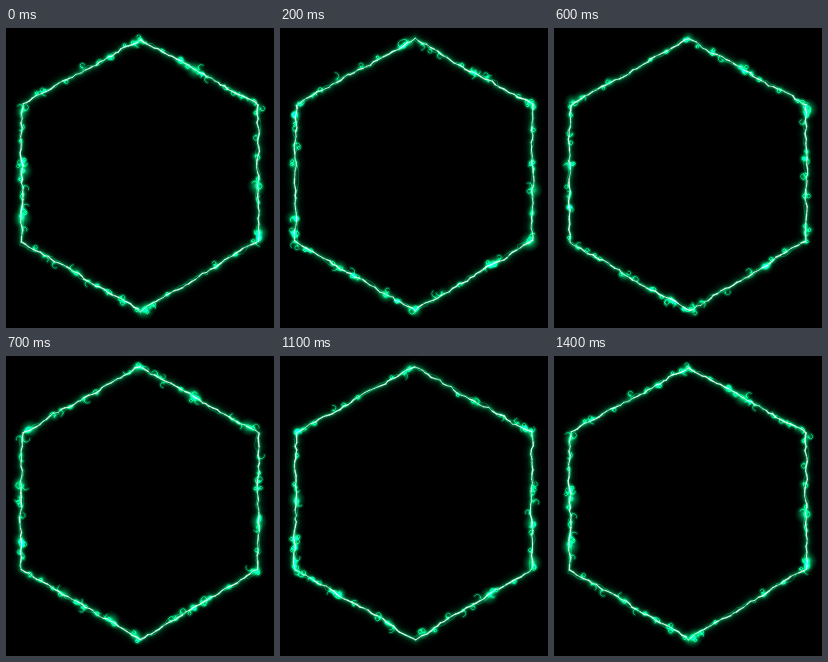
These frames come from a looping animation (268 by 300 pixels, 1.5 s). An HTML page with a canvas:

```html
<!DOCTYPE html>
<html lang="en">
<head>
<meta charset="utf-8">
<title>Electric hexagon</title>
<style>
html, body { margin: 0; width: 100%; height: 100%; overflow: hidden; background: #000; }
canvas { display: block; }
</style>
</head>
<body>
<canvas id="stage" width="268" height="300"></canvas>
<script>
const ctx = document.getElementById('stage').getContext('2d');
const STEP = 100, STEPS = 15, POSES = 14;
const CORNERS = [[134, 11], [252, 77], [252, 213], [135, 283], [15, 214], [16, 77]];
const PER_EDGE = 32;

// Places that keep flaring up: edge number plus the fraction along that edge.
const ANCHORS = [0, .46, .97, 1.6, 2, 2.39, 2.97, 3.22, 3.6, 4.22, 4.57, 5];

function seeded(seed) {
  let s = seed * 7919;
  return () => {
    s = (s + 0x6D2B79F5) | 0;
    let n = Math.imul(s ^ (s >>> 15), 1 | s);
    n = (n + Math.imul(n ^ (n >>> 7), 61 | n)) ^ n;
    return ((n ^ (n >>> 14)) >>> 0) / 4294967296;
  };
}

function pointAt(pos) {
  pos = (pos + 6) % 6;
  const edge = Math.floor(pos), f = pos - edge;
  const [ax, ay] = CORNERS[edge], [bx, by] = CORNERS[(edge + 1) % 6];
  return [ax + (bx - ax) * f, ay + (by - ay) * f];
}

function stroke(points, color, width, closed) {
  ctx.beginPath();
  points.forEach(([x, y]) => ctx.lineTo(x, y));
  if (closed) ctx.closePath();
  ctx.strokeStyle = color;
  ctx.lineWidth = width;
  ctx.stroke();
}

// A closed jagged line: each offset drifts back to the edge while being kicked.
function bolt(jitter, kick) {
  let dx = 0, dy = 0;
  return Array.from({ length: 6 * PER_EDGE }, (_, i) => {
    dx = dx * .5 + jitter(kick);
    dy = dy * .5 + jitter(kick);
    const [x, y] = pointAt(i / PER_EDGE);
    return [x + dx, y + dy];
  });
}

function glow(x, y, radius, alpha) {
  const g = ctx.createRadialGradient(x, y, 0, x, y, radius);
  g.addColorStop(0, `rgba(20,225,140,${alpha})`);
  g.addColorStop(.4, `rgba(0,185,105,${alpha * .55})`);
  g.addColorStop(1, 'rgba(0,120,65,0)');
  ctx.fillStyle = g;
  ctx.fillRect(x - radius, y - radius, radius * 2, radius * 2);
}

// A tight curl with its own soft glow, hugging the bolt.
function curl(rand, [x, y]) {
  const points = [], turn = (rand() < .5 ? -1 : 1) * (.4 + rand() * .8);
  let angle = rand() * 2 * Math.PI;
  for (let i = 0; i < 7; i++) {
    points.push([x, y]);
    x += Math.cos(angle) * 1.5;
    y += Math.sin(angle) * 1.5;
    angle += turn;
  }
  stroke(points, 'rgba(0,170,95,.22)', 3.5);
  stroke(points, 'rgba(10,215,130,.6)', .9);
}

function draw(pose) {
  const rand = seeded(pose + 1);
  const jitter = size => (rand() - .5) * size;
  const near = (pos, size) => pointAt(pos).map(v => v + jitter(size));
  const main = bolt(jitter, 2.4);

  ctx.globalCompositeOperation = 'source-over';
  ctx.fillStyle = '#000';
  ctx.fillRect(0, 0, 268, 300);
  ctx.globalCompositeOperation = 'lighter';
  ctx.lineJoin = ctx.lineCap = 'round';

  for (const [width, alpha] of [[17, .03], [12, .06], [8, .11], [5, .18], [3, .2]])
    stroke(main, `rgba(0,180,100,${alpha})`, width, true);
  stroke(bolt(jitter, 4.5), 'rgba(0,190,110,.4)', .8, true);

  for (let i = 0; i < 54; i++) {
    const spot = near(rand() * 6, 5);
    glow(...spot, 3 + rand() * 4, .2 + rand() * .4);
    curl(rand, spot);
  }
  for (const anchor of ANCHORS) {
    const pos = anchor + jitter(.14), strength = rand();
    glow(...near(pos, 5), 6 + strength * 5, .35 + strength * .5);
    curl(rand, near(pos, 6));
    curl(rand, near(pos, 6));
  }

  // The white core swells and thins along its length.
  ctx.globalCompositeOperation = 'source-over';
  main.forEach((point, i) => {
    const next = main[(i + 1) % main.length];
    stroke([point, next], 'rgba(225,255,240,.9)', .7 + rand() * .8);
  });
}

function tick(now) {
  const step = Math.floor(now / STEP) % STEPS;
  draw(step % POSES);
  requestAnimationFrame(tick);
}
tick(performance.now());
</script>
</body>
</html>
```
